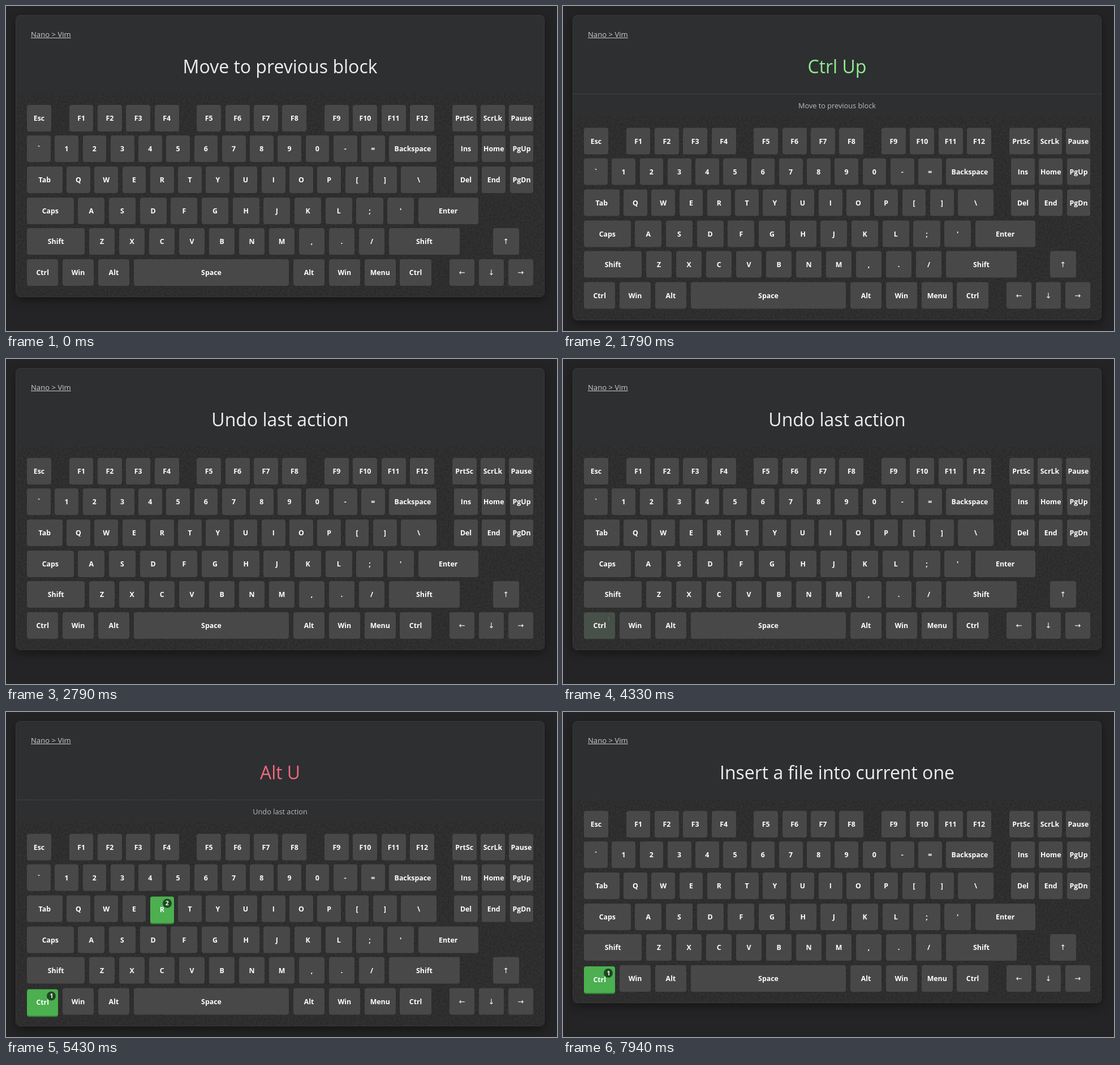
An HTML page for the animation above (7990 ms loop, 974 by 575 pixels).

```html
<!DOCTYPE html>
<html lang="en">
<head>
<meta charset="utf-8">
<title>Shortcut trainer</title>
<style>
@property --p { syntax: "<number>"; inherits: true; initial-value: 0; }
@property --s { syntax: "<length>"; inherits: true; initial-value: 0px; }

html, body { margin: 0; width: 100%; height: 100%; overflow: hidden; background: #242426; }
body { position: relative; font-family: "Open Sans", "Noto Sans", sans-serif; color: #eee; }

.stage { position: absolute; inset: 0; animation: expand 7990ms step-end infinite; }
.stage > * { position: absolute; box-sizing: border-box; }

.card {
  left: 17px; top: 16px; width: 935px; height: calc(499px + var(--s));
  background: #2e2f31; border: 1px solid #39393b; border-radius: 8px;
  box-shadow: 0 6px 18px rgba(0, 0, 0, .4);
}
.link { left: 44px; top: 40px; font-size: 13.1px; line-height: 20px; color: #ccc; text-decoration: underline; }

.title, .detail { left: 17px; width: 935px; text-align: center; white-space: nowrap; opacity: 0; }
.title { top: 87px; font-size: 32px; line-height: 40px; }
.detail {
  top: 155px; height: 41px; font-size: 12.75px; line-height: 40px; color: #bbb;
  border-top: 1px dashed #4b4b4d;
}
.good { color: #90ee90; }
.bad { color: #f4687f; }
.a, .b, .c, .d, .e { animation: 7990ms step-end infinite; }
.a { animation-name: first; }
.b { animation-name: second; }
.c { animation-name: third; }
.d { animation-name: fourth; }
.e { animation-name: fifth; }

.board { left: 18px; top: 155px; width: 933px; height: 359px; transform: translateY(var(--s)); }
.board svg { position: absolute; inset: 0; width: 100%; height: 100%; border-radius: 0 0 7px 7px; background: #323232; }

.key {
  position: absolute; height: 47px; border-radius: 4px; background: #484848;
  color: #fff; font-size: 12.35px; font-weight: 700; line-height: 47px;
  display: flex; justify-content: center; white-space: nowrap;
}
.arrow { font: 13px/47px "DejaVu Sans", sans-serif; }
.hot {
  background: color-mix(in srgb, #4caf50 calc(var(--p) * 100%), #484848);
  transform: translateY(calc(var(--p) * 2px));
  box-shadow: 0 calc(var(--p) * 2px) 0 rgb(46 125 50 / var(--p));
  animation: 7990ms ease infinite;
}
.ctrl { animation-name: ctrl; }
.up { animation-name: up; }
.r { animation-name: r; }
.badge {
  position: absolute; top: 4px; right: 4px; width: 16px; height: 16px; border-radius: 50%;
  background: #1f4822; color: #fff; text-align: center;
  font: 700 10.5px/16px "Open Sans", sans-serif; opacity: var(--p);
}

@keyframes expand {
  0% { --s: 0px; } 22.402% { --s: 40.5px; } 34.917% { --s: 0px; }
  65.956% { --s: 40.5px; } 86.983%, 100% { --s: 0px; }
}
@keyframes first { 0% { opacity: 1; } 22.402%, 100% { opacity: 0; } }
@keyframes second { 0% { opacity: 0; } 22.402% { opacity: 1; } 34.917%, 100% { opacity: 0; } }
@keyframes third { 0% { opacity: 0; } 34.917% { opacity: 1; } 65.956%, 100% { opacity: 0; } }
@keyframes fourth { 0% { opacity: 0; } 65.956% { opacity: 1; } 86.983%, 100% { opacity: 0; } }
@keyframes fifth { 0% { opacity: 0; } 86.983%, 100% { opacity: 1; } }

/* Presses ease in, play again when the answer opens, and end at once. */
@keyframes ctrl {
  0%, 6.133% { --p: 0; } 7.822%, 22.401% { --p: 1; }
  22.402% { --p: 0; } 24.53%, 34.916% { --p: 1; }
  34.917%, 54.005% { --p: 0; } 56.133%, 65.955% { --p: 1; }
  65.956% { --p: 0; } 68.085%, 86.982% { --p: 1; }
  86.983%, 97.184% { --p: 0; } 99.312%, 100% { --p: 1; }
}
@keyframes up {
  0%, 10.2% { --p: 0; } 12.328%, 22.401% { --p: 1; }
  22.402% { --p: 0; } 24.53%, 34.916% { --p: 1; }
  34.917%, 100% { --p: 0; }
}
@keyframes r {
  0%, 58.448% { --p: 0; } 60.576%, 65.955% { --p: 1; }
  65.956% { --p: 0; } 68.085%, 86.982% { --p: 1; }
  86.983%, 100% { --p: 0; }
}
</style>
</head>
<body>
<div class="stage">
  <div class="card"></div>
  <div class="link">Nano &gt; Vim</div>
  <div class="title a">Move to previous block</div>
  <div class="title good b">Ctrl Up</div>
  <div class="detail b">Move to previous block</div>
  <div class="title c">Undo last action</div>
  <div class="title bad d">Alt U</div>
  <div class="detail d">Undo last action</div>
  <div class="title e">Insert a file into current one</div>
  <div class="board">
    <svg aria-hidden="true">
      <filter id="grain" x="0" y="0" width="100%" height="100%">
        <feTurbulence type="fractalNoise" baseFrequency=".3" numOctaves="2" seed="4"/>
        <feColorMatrix values="0 0 0 0 0  0 0 0 0 0  0 0 0 0 0  .4 0 0 0 -.12"/>
      </filter>
      <rect width="100%" height="100%" filter="url(#grain)"/>
    </svg>
  </div>
</div>
<script>
// Each row: unit width, then keys as label*units; _n adds n pixels of space.
const rows = [
  [42.85, "Esc _24.3 F1 F2 F3 F4 _24.3 F5 F6 F7 F8 _24.3 F9 F10 F11 F12 _24.3 PrtSc ScrLk Pause"],
  [41.75, "` 1 2 3 4 5 6 7 8 9 0 - = Backspace*2 _23.9 Ins Home PgUp"],
  [41.75, "Tab*1.5 Q W E R T Y U I O P [ ] \\*1.5 _23.9 Del End PgDn"],
  [47.2, "Caps*1.75 A S D F G H J K L ; ' Enter*2.24"],
  [45.5, "Shift*2.25 Z X C V B N M , . / Shift*2.75 _51.5 ↑"],
  [44.3, "Ctrl*1.25 Win*1.25 Alt*1.25 Space*6.2 Alt*1.25 Win*1.25 Menu*1.25 Ctrl*1.25 _24.7 ← ↓ →"]
];
const gap = 7.5, pitch = 54.7;
const board = document.querySelector(".board");
const hot = { Ctrl: ["ctrl", 1], "↑": ["up", 2], R: ["r", 2] };

function add(parent, cls, text) {
  const el = document.createElement("div");
  el.className = cls;
  el.textContent = text;
  return parent.appendChild(el);
}

rows.forEach(([unit, keys], row) => {
  let x = 19;
  for (const token of keys.split(" ")) {
    if (token[0] === "_") { x += +token.slice(1); continue; }
    const [label, units = 1] = token.split("*");
    const width = unit * units;
    const key = add(board, "key", label);
    key.style.cssText = `left:${x}px; top:${19.5 + row * pitch}px; width:${width}px`;
    if ("←↑↓→".includes(label)) key.classList.add("arrow");
    if (hot[label]) {
      const [name, order] = hot[label];
      key.classList.add("hot", name);
      add(key, "badge", order);
      delete hot[label]; // only the left Ctrl reacts
    }
    x += width + gap;
  }
});
</script>
</body>
</html>
```
